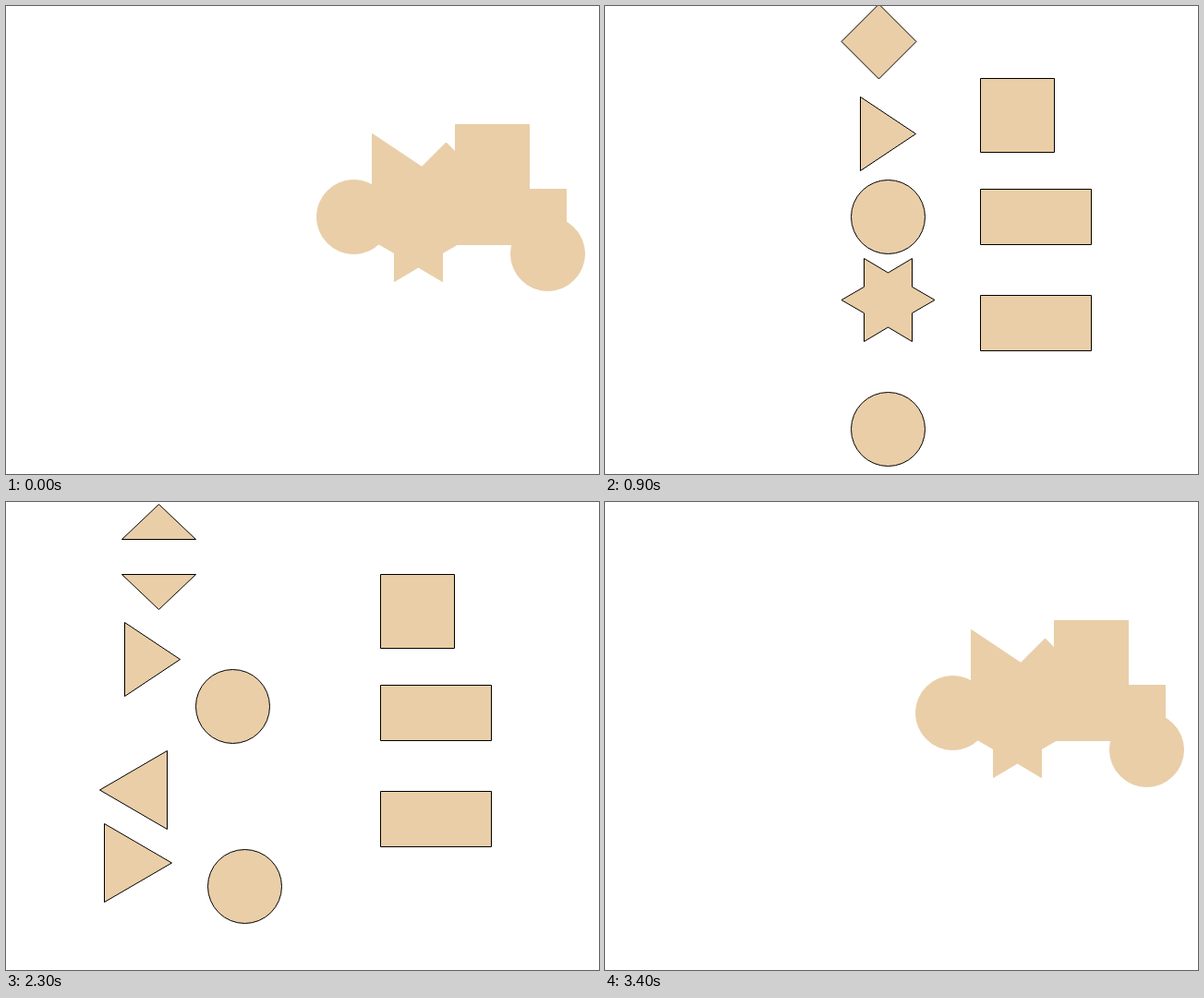
These frames come from a looping animation (642x507 px, 3.5 s). An HTML page with a canvas:

```html
<!DOCTYPE html>
<html lang="en">
<head>
<meta charset="utf-8">
<title>Shapes</title>
<style>
html, body { margin: 0; width: 100%; height: 100%; overflow: hidden; background: #fff; }
canvas { display: block; }
</style>
</head>
<body>
<canvas id="stage" width="642" height="507"></canvas>
<script>
const ctx = document.getElementById("stage").getContext("2d");
const STEP = 100, STEPS = 35;
const SPLIT = 17, RETURN = 28, JOIN = 30;
const LEGS = [0, 4, 9, 13, 19, 27];
const TAN = [233, 206, 168];

const mix = (a, b, k) => a + (b - a) * k;
const apart = s => s >= SPLIT && s < JOIN;

// Shape outlines, relative to the anchor
const disc = () => ctx.arc(0, 0, 40, 0, Math.PI * 2);
const box = (w, h) => () => ctx.rect(0, 0, w, h);
const poly = (...pts) => () => pts.forEach(([x, y]) => ctx.lineTo(x, y));
const wedge = poly([0, 0], [60, 40], [0, 80]);
const roof = poly([-40, 0], [0, -38], [40, 0]);
const keel = poly([-40, 0], [0, 38], [40, 0]);
const leftTri = poly([-36.5, 0], [36.5, -42.5], [36.5, 42.5]);
const rightTri = poly([-36.5, -42.5], [36.5, 0], [-36.5, 42.5]);
const diamond = poly([-40.5, 0], [0, -40.5], [40.5, 0], [0, 40.5]);

// Two crossed triangles: a quarter outline, mirrored
function star() {
  const quarter = [[50.5, 0], [26, 14.2], [26, 45], [0, 29.5]];
  const half = [...quarter, ...quarter.slice(0, 3).reverse().map(([x, y]) => [-x, y])];
  poly(...half, ...half.slice(1, 6).reverse().map(([x, y]) => [x, -y]))();
}

function paint(outline, x, y) {
  ctx.save();
  ctx.translate(Math.round(x) + 0.5, Math.round(y) + 0.5);
  ctx.beginPath();
  outline();
  ctx.closePath();
  ctx.fill();
  ctx.stroke();
  ctx.restore();
}

const solid = outline => (x, y) => paint(outline, x, y);

// The halves part vertically at a steady rate
function diamondParts(x, y, s) {
  if (!apart(s)) return paint(diamond, x, y);
  const gap = 3.1 * (s - SPLIT);
  paint(roof, x, y - gap);
  paint(keel, x, y + gap);
}

// The triangles slide past each other and come to rest in one column
function starParts(x, y, s) {
  if (!apart(s)) return paint(star, x, y);
  const age = s - SPLIT;
  const dx = 13 * Math.exp(-0.28 * age), dy = 40 * (1 - 0.5 ** age);
  ctx.save();
  ctx.translate(-0.5, -0.5);
  paint(leftTri, x - dx + 0.5, y - dy + 0.5);
  paint(rightTri, x + dx + 0.5, y + dy + 0.5);
  ctx.restore();
}

// Key points at the start of each leg; a short list stays parked at its end
const parts = [
  [diamondParts, [476, 188], [396, 48], [296, 38], [256, 38], [205, 43], [96, 88]],
  [solid(wedge), [396, 138], [346, 98], [276, 98], [216, 98], [166, 98], [60, 188]],
  [solid(disc), [376, 228], [376, 228], [306, 228], [246, 228], [246, 228], [246, 208]],
  [starParts, [446, 253], [396, 333], [306, 318], [206, 338], [165, 340.5], [98, 370.5]],
  [solid(disc), [586, 268], [516, 428], [306, 458], [266, 458], [266, 458], [246, 338]],
  [solid(box(80, 80)), [486, 128], [436, 78], [406, 78]],
  [solid(box(120, 60)), [486, 198], [476, 288], [406, 313]],
  [solid(box(120, 60)), [406, 188], [406, 188], [406, 198]]
];

function place(path, s) {
  if (s > RETURN) {
    const k = Math.min(1, (s - RETURN) / (JOIN - RETURN));
    return place(path, RETURN).map((v, n) => mix(v, path[0][n], k));
  }
  const leg = Math.min(LEGS.length - 2, LEGS.findLastIndex(t => t <= s));
  const k = ((s - LEGS[leg]) / (LEGS[leg + 1] - LEGS[leg])) ** 1.5;
  const point = i => path[Math.min(i, path.length - 1)];
  return point(leg).map((v, n) => mix(v, point(leg + 1)[n], k));
}

const shade = k => `rgb(${TAN.map(c => Math.round(c * k)).join(",")})`;

// Outlines vanish into the fill once the parts are joined
const lineTone = s => s === 0 ? 1 : Math.max(0, (s - JOIN) / (STEPS - 1 - JOIN));

function render(s) {
  ctx.fillStyle = "#fff";
  ctx.fillRect(0, 0, 642, 507);
  ctx.fillStyle = shade(1);
  ctx.strokeStyle = shade(lineTone(s));
  ctx.lineJoin = "round";
  const shift = apart(s) ? -1 : 0;
  for (const [draw, ...path] of parts) {
    const [x, y] = place(path, s);
    draw(x + shift, y, s);
  }
}

const start = performance.now();
function tick() {
  const t = Math.max(0, performance.now() - start);
  render(Math.floor(t / STEP) % STEPS);
  requestAnimationFrame(tick);
}
tick();
</script>
</body>
</html>
```
